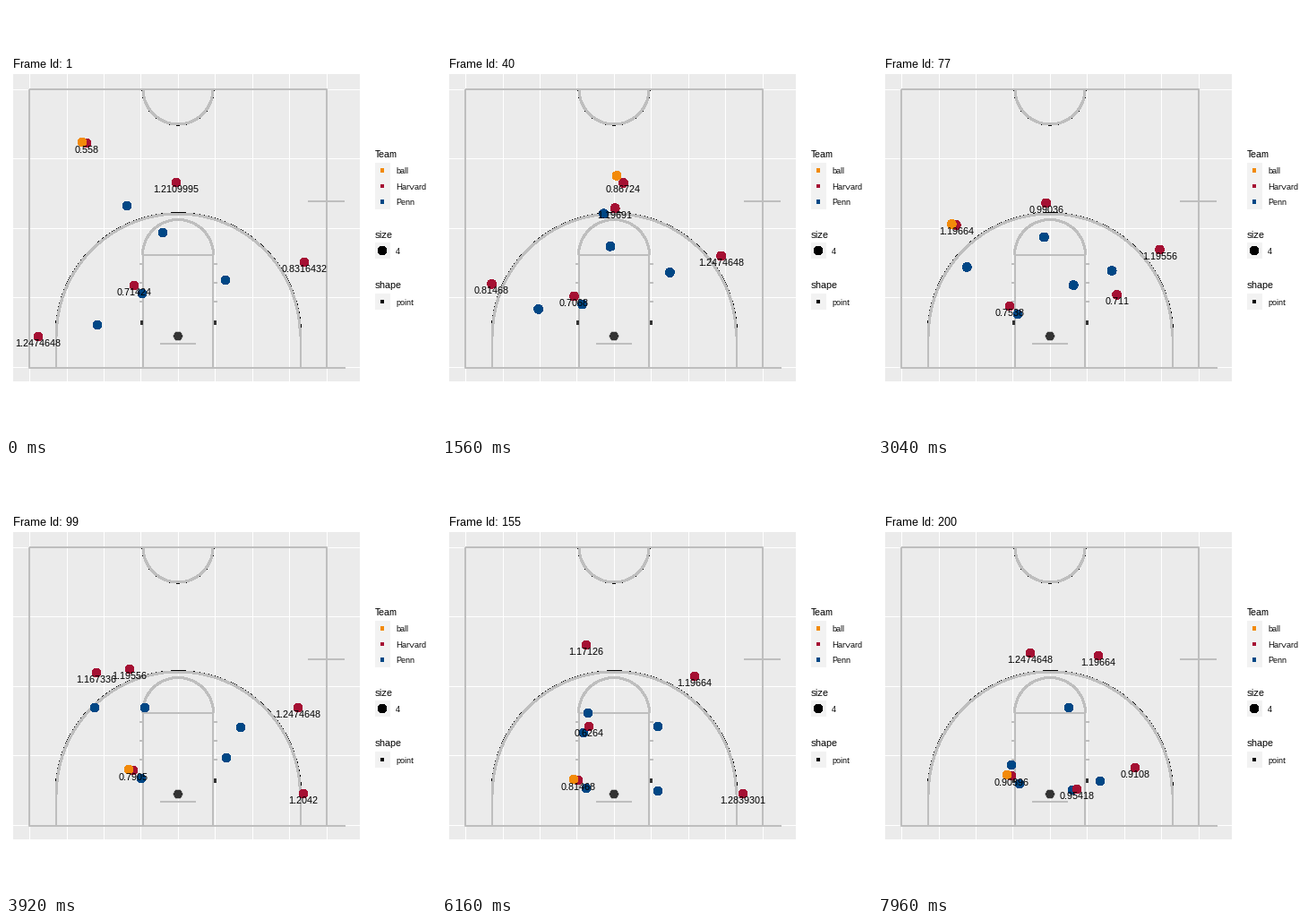
Write a matplotlib script that moves like this. It is 480 px wide and 480 px high and loops after 8000 ms.

```python
import numpy as np
import matplotlib.pyplot as plt
from matplotlib.animation import FuncAnimation
from matplotlib.patches import Circle, Rectangle

SIZE, DPI, FRAMES, STEP = 480, 80, 200, 40
PT = 72 / DPI  # points per pixel
CRIMSON, NAVY, ORANGE = "#A51033", "#004785", "#F28A0A"
GREY, DARK = "#BEBEBE", "#333333"
BEATS = np.array([0, 24, 54, 98, 127, 154, 199])  # frames the play turns on
FLIGHT, LOB = 12, 20                              # length and height of a pass

plt.rcParams.update({"font.family": "Liberation Sans",
                     "text.hinting": "native", "text.hinting_factor": 1})
fig = plt.figure(figsize=(SIZE / DPI, SIZE / DPI), dpi=DPI, facecolor="white")
ax = fig.add_axes([0, 0, 1, 1])
ax.set_xlim(0, SIZE)
ax.set_ylim(SIZE, 0)
ax.axis("off")


def box(x, y, w, h, color, z=1):
    ax.add_patch(Rectangle((x, y), w, h, fc=color, lw=0, zorder=z))


def line(xs, ys, color=GREY, z=3, **kw):
    ax.plot(xs, ys, color=color, lw=2 * PT, zorder=z,
            solid_capstyle="butt", **kw)


def arc(cx, cy, r, start, end, rim=0):
    """Grey arc; a dark one `rim` wider peeps out from under it."""
    a = np.radians(np.linspace(start, end, 120))
    if rim:
        line(cx + (r + rim) * np.cos(a), cy - (r + rim) * np.sin(a),
             "black", 2.9, antialiased=False)
    line(cx + r * np.cos(a), cy - r * np.sin(a), antialiased=False)


def dot(x, y, color, r=4.9, z=6):
    return ax.add_patch(Circle((x, y), r, fc=color, lw=0, zorder=z,
                               antialiased=False))


def text(x, y, s, size, **kw):
    return ax.text(x, y, s, fontsize=size * PT, color="black", zorder=9, **kw)


def draw_court():
    box(8, 76, 387, 343, "#EBEBEB")
    for k in range(5):
        box(8, int(93 + 77.6 * k), 387, 1, "white", 2)
    for k in range(9):
        box(int(26.6 + 41.45 * k), 76, 1, 343, "white", 2)

    line([26, 358, 358, 26, 26], [93, 93, 404, 404, 93])
    line([358, 379], [404, 404])
    line([337, 378], [218, 218])
    arc(192, 93, 39, 180, 360, .04)

    line([153, 153, 231, 231], [404, 278, 278, 404])
    arc(192, 278, 39.5, 0, 180)
    for y in (288, 309, 330):
        line([149, 153], [y, y])
        line([231, 236], [y, y])
    for x in (150, 232):
        box(x, 351, 3, 5, DARK, 4)

    arc(192.3, 368, 136, 0, 180, .25)
    line([56, 56], [368, 404])
    line([329, 329], [368, 404])

    line([172, 212], [377, 377])
    dot(192, 368.5, GREY, 5.2, 3)
    dot(192, 368.5, DARK, 4.3, 4)


def draw_legend():
    def key(y, label, color, r=2):
        box(412, y - 8.6, 17.3, 17.3, "#F2F2F2")
        dot(420, y, color, r)
        text(435, y + 3.9, label, 9)

    text(412, 169, "Team", 11)
    for k, (name, color) in enumerate([("ball", ORANGE), ("Harvard", CRIMSON),
                                       ("Penn", NAVY)]):
        key(183.5 + 17.5 * k, name, color)
    text(412, 259, "size", 11)
    key(273, "4", "black", 4.9)
    text(412, 315, "shape", 11)
    key(330, "point", "black")


def smooth(v):
    """Monotone cubic through one value per beat, sampled at every frame."""
    h, d = np.diff(BEATS), np.diff(v) / np.diff(BEATS)
    m = np.zeros(len(v))
    for k in range(1, len(v) - 1):
        if d[k - 1] * d[k] > 0:
            m[k] = 2 * d[k - 1] * d[k] / (d[k - 1] + d[k])
    m[0], m[-1] = d[0], d[-1]
    f = np.arange(FRAMES)
    k = np.clip(np.searchsorted(BEATS, f, side="right") - 1, 0, len(h) - 1)
    s = (f - BEATS[k]) / h[k]
    return ((1 + 2 * s) * (1 - s) ** 2 * v[k] + s * (1 - s) ** 2 * h[k] * m[k]
            + s * s * (3 - 2 * s) * v[k + 1] + s * s * (s - 1) * h[k] * m[k + 1])


def route(*spots):
    """Path of one player, given the spot reached on each beat."""
    return np.column_stack([smooth(v) for v in np.array(spots, float).T])


def carry(first, passes, offset=(-5, -1)):
    """Ball path: stays at a holder's side and is lobbed on to the next."""
    path = first + offset
    for start, taker in passes:
        t = np.clip((np.arange(FRAMES) - start) / FLIGHT, 0, 1)
        path = path + (taker + offset - path) * t[:, None]
        path[:, 1] -= LOB * np.sin(np.pi * t)
    return path


draw_court()
draw_legend()

top = route((90, 153), (160, 188), (226, 205), (138, 229),
            (118, 219), (161, 202), (170, 211))
cutter = route((190, 197), (191, 206), (198, 256), (332, 368),
               (334, 370), (336, 368), (287, 339))
wing = route((333, 286), (324, 286), (303, 272), (326, 272),
             (315, 269), (282, 237), (246, 214))
post = route((143, 312), (143, 321), (152, 327), (142, 342),
             (148, 345), (152, 353), (149, 348))
left = route((36, 369), (42, 350), (72, 270), (101, 233),
             (119, 252), (164, 293), (222, 363))
attack = [
    (top, "0.558 0.86724 0.99036 1.19556 1.19664 1.17126 1.2474648"),
    (cutter, "1.2109995 1.19691 0.711 1.2042 1.22481 1.2839301 0.9108"),
    (wing, "0.8316432 1.2474648 1.19556 1.2474648 1.2474648 1.19664 1.19664"),
    (post, "0.71424 0.7068 0.7538 0.7905 0.63426 0.81468 0.90396"),
    (left, "1.2474648 0.81468 1.19664 1.167336 1.22481 0.6264 0.95418"),
]
defence = [
    route((135, 223), (147, 225), (208, 242), (155, 272),
          (141, 281), (163, 278), (149, 336)),
    route((175, 253), (187, 251), (189, 293), (246, 328),
          (234, 352), (241, 365), (248, 354)),
    route((102, 356), (115, 350), (100, 322), (99, 272),
          (136, 296), (158, 300), (217, 364)),
    route((245, 306), (249, 298), (259, 297), (262, 294),
          (262, 293), (241, 293), (213, 272)),
    post + (9, 9),  # shadows the post player
]
ball = carry(top, [(12, cutter), (30, top), (52, left), (84, post)])

title = text(8, 69, "", 13)
movers = ([(p, dot(0, 0, NAVY, z=5)) for p in defence]
          + [(p, dot(0, 0, CRIMSON, z=6)) for p, _ in attack]
          + [(ball, dot(0, 0, ORANGE, z=7))])
tags = [(p, s.split(), text(0, 0, "", 11, ha="center")) for p, s in attack]


def update(i):
    title.set_text(f"Frame Id: {i + 1}")
    for path, mark in movers:
        mark.set_center(path[i])
    beat = np.abs(BEATS - i).argmin()
    for path, values, tag in tags:
        tag.set_position(path[i] + (0, 11))
        tag.set_text(values[beat])
    return []


anim = FuncAnimation(fig, update, frames=FRAMES, interval=STEP,
                     init_func=lambda: update(0), repeat=True, repeat_delay=0)
plt.show()
```
